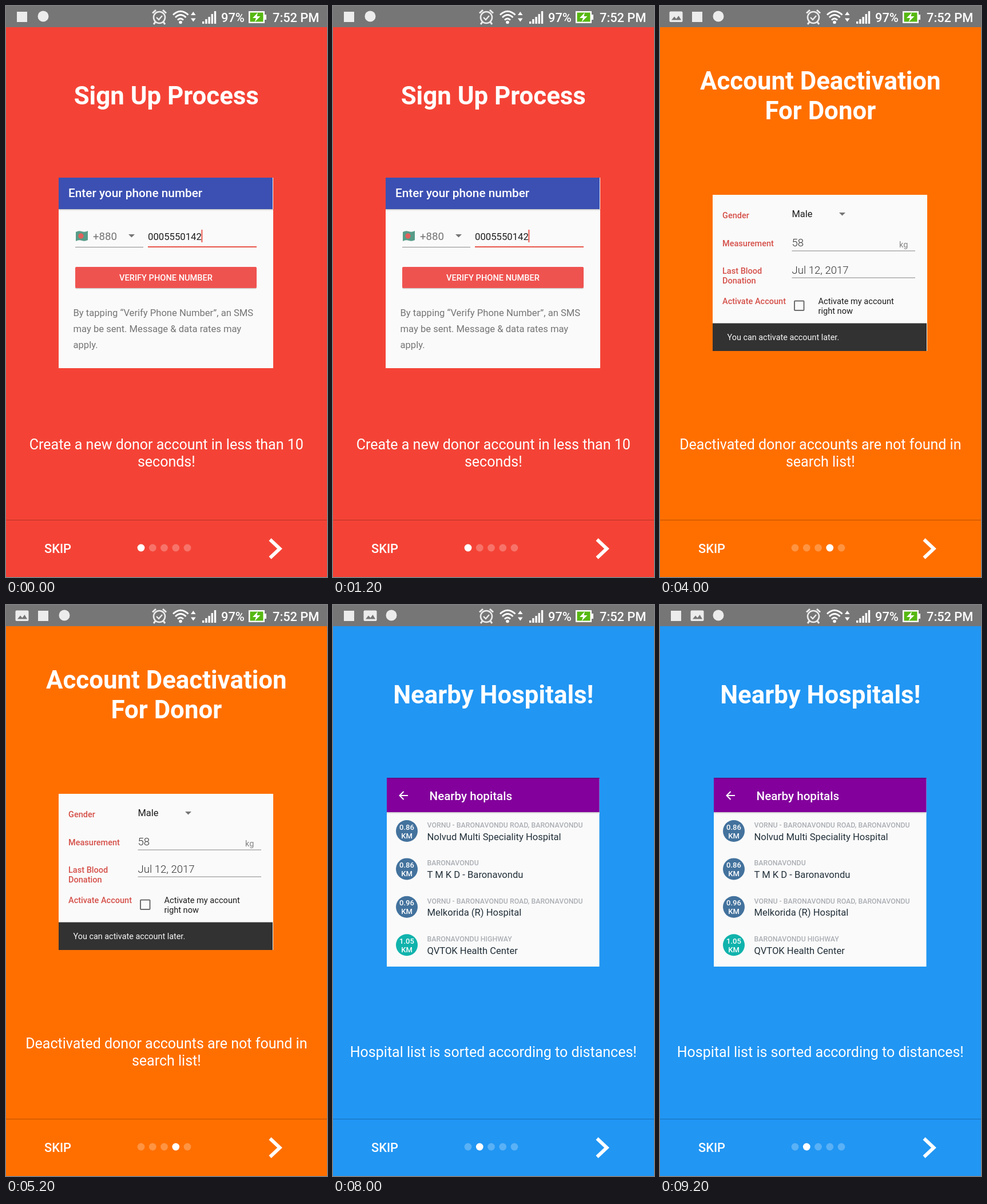
Recreate the animation shown at these times as an HTML page. Size 561 by 998 pixels, loop 10000 ms.

```html
<!DOCTYPE html>
<html lang="en">
<head>
<meta charset="utf-8">
<title>Donor app intro</title>
<style>
  html, body { margin: 0; width: 100%; height: 100%; overflow: hidden; }
  svg { display: block; width: 100vw; height: 100vh; }
  text { font-family: Roboto, sans-serif; white-space: pre; }
</style>
</head>
<body>
<svg id="stage" viewBox="0 0 561 998" xmlns="http://www.w3.org/2000/svg"></svg>
<script>
const STEP = 2000;
const GREY = '#757575', INK = '#1c1c1c', PAPER = '#fafafa', ICON = '#ececec';
const CALLER = '0005550142', HELPER = '0005550173';

// Drawing helpers
const text = (x, y, size, fill, str, weight = 400, anchor = 'start') =>
  `<text x="${x}" y="${y}" font-size="${size}" fill="${fill}" font-weight="${weight}" text-anchor="${anchor}">${str}</text>`;
const mid = (x, y, size, fill, str, weight) => text(x, y, size, fill, str, weight, 'middle');
const rect = (x, y, w, h, fill, r = 0) =>
  `<rect x="${x}" y="${y}" width="${w}" height="${h}" rx="${r}" fill="${fill}"/>`;
const disc = (x, y, r, fill, alpha = 1) =>
  `<circle cx="${x}" cy="${y}" r="${r}" fill="${fill}" fill-opacity="${alpha}"/>`;
const shape = (d, fill) => `<path d="${d}" fill="${fill}"/>`;
const stroke = (d, color, width) =>
  `<path d="${d}" fill="none" stroke="${color}" stroke-width="${width}"/>`;
const caret = (x, y) => shape(`M${x} ${y}h11l-5.5 5.5z`, GREY);
const shadow = (x, y, w) => rect(x, y, w, 1, '#c4c4c4') + rect(x, y + 1, w, 2, '#ebebeb');

// Status bar
const notices = {
  video: x => rect(x - 9, 10, 18, 18, ICON),
  robot: x => disc(x, 18, 9.5, ICON),
  picture: x => rect(x - 11.5, 9.5, 23, 18.5, ICON, 2) +
    shape(`M${x - 8} 24.5l5-6 3.5 4 4-5.5 4.500 7.500z`, GREY)
};

function statusBar(icons) {
  const bars = [4, 8, 12, 17, 22].map((h, i) => rect(343 + i * 5.2, 31 - h, 3.4, h, '#fff')).join('');
  return rect(0, 0, 561, 37, '#767676') +
    icons.map((name, i) => notices[name]([28, 65, 102][i])).join('') +
    `<circle cx="268" cy="20" r="10" fill="none" stroke="${ICON}" stroke-width="2.6"/>` +
    stroke('M256 12.500l6-5.500M280 12.500l-6-5.500M261 28l-3 4M275 28l3 4', ICON, 3) +
    stroke('M263 20l4 4 6-7', ICON, 2.4) +
    stroke('M292 15.500Q305 3 318.500 15.500M296 20Q305 11 314.500 20M300 24.500Q305 19.500 310 24.500', '#fff', 2.8) +
    disc(305, 28.5, 2.8, '#fff') +
    shape('M323 16l4.300-6 4.300 6zM323 21.500h8.600l-4.300 6z', '#fff') +
    bars +
    text(376, 27.5, 21.8, '#fff', '97%', 500) +
    rect(424, 9, 28, 21, '#fff') + rect(452, 15, 3, 9, '#fff') + rect(426.5, 11.5, 23, 16, '#57b812') +
    shape('M440 11.500l-9 9.500h6l-2.500 7 10-10h-6z', '#fff') +
    text(466, 27.5, 21.8, '#fff', '7:52 PM', 500);
}

// Bottom navigation
function footer(page) {
  const dots = [0, 1, 2, 3, 4].map(i =>
    disc(236 + i * 20.25, 947, 6.4, '#fff', i === page ? 1 : 0.26)).join('');
  const ends = page === 4
    ? mid(470.5, 956, 21.8, '#fff', 'DONE', 500)
    : mid(90.5, 956, 21.8, '#fff', 'SKIP', 500) + stroke('M461.500 932.500L478.500 948.500 461.500 964.500', '#fff', 6);
  return rect(0, 898, 561, 1, 'rgba(0,0,0,.26)') + dots + ends;
}

function signUp() {
  return rect(92, 300, 375, 333, PAPER) + rect(92, 300, 374, 55, '#3c50b3') + shadow(92, 355, 375) +
    text(109, 334, 20.8, '#fff', 'Enter your phone number', 500) +
    shape('M122 395q5-3 10.500-1t10.500-1v16q-5 3-10.500 1t-10.500 1z', '#579c88') + disc(131, 402, 4.7, '#e2605c') +
    text(152, 408.5, 18.7, GREY, '+880') + caret(214, 399) +
    rect(121, 421, 119, 1, '#8b8b8b') +
    text(248, 408.5, 16.7, INK, CALLER) +
    rect(341.5, 391, 1.8, 22, '#ea4e40') + rect(248, 420, 190, 2, '#e8564b') +
    rect(121, 457, 317, 37.5, '#cfcfcf', 2) + rect(121, 456, 317, 37, '#ef5350', 2) +
    mid(279.5, 480, 14.6, '#fff', 'VERIFY PHONE NUMBER', 500) +
    ['By tapping “Verify Phone Number”, an SMS', 'may be sent. Message &amp; data rates may', 'apply.']
      .map((line, i) => text(117.5, 542 + i * 28, 16.6, GREY, line)).join('');
}

function gear(x, y) {
  const teeth = [0, 45, 90, 135].map(a =>
    `<rect x="${x - 2.2}" y="${y - 10}" width="4.4" height="20" fill="#fff" transform="rotate(${a} ${x} ${y})"/>`).join('');
  return disc(x, y, 20, '#0bbbdc') + teeth + disc(x, y, 7.5, '#fff') + disc(x, y, 4.8, '#0bbbdc') + disc(x, y, 2.2, '#fff');
}

function notified() {
  const cyan = '#0bbbdc';
  return `<defs><linearGradient id="glow" x1="0" y1="0" x2="1" y2=".5">
      <stop offset=".55" stop-color="#000"/><stop offset=".8" stop-color="#381009"/><stop offset="1" stop-color="#080302"/>
    </linearGradient></defs>` +
    rect(101, 335, 358.5, 263.5, '#050505') + rect(330, 552, 129, 46, 'url(#glow)') +
    rect(102, 335, 357, 142, '#fdfdfd', 3) + rect(102, 486, 357, 66, '#f8f8f8', 3) +
    text(112, 404, 66, '#5c5c5c', '8:35', 100) + text(235.5, 404, 14, '#666', 'AM') +
    text(113, 428.5, 16.55, '#666', 'Wednesday, November 22, 2017') +
    gear(377, 370.5) +
    disc(428, 370.5, 20, cyan) +
    shape('M428 356c6.500 0 8.500 4.500 8 10.500-.5 5-2 7-4 9v4c3 2.500 7 2 8.500 5a19 19 0 0 1-25 0c1.500-3 5.500-2.500 8.500-5v-4c-2-2-3.500-4-4-9-.5-6 1.500-10.500 8-10.500z', '#a0e2ef') +
    rect(356, 404.5, 92, 31.5, cyan, 15.75) + mid(402, 428, 20, '#fff', 'Clear') +
    rect(119, 446.5, 322, 1, '#a9a9a9') +
    text(118.5, 466, 15.2, '#666', 'Navu/Colvimar 3G') +
    disc(134.5, 519, 21, '#9c9c9c') +
    shape('M127 524v-1.500l2-2v-4c0-3 1.500-5 4-5.500v-2h3v2c2.500.5 4 2.500 4 5.500v4l2 2v1.500zM132.500 525.500h4a2 2 0 0 1-4 0z', '#fff') +
    stroke('M134.500 514v6.500M131.300 517.200h6.500', '#9c9c9c', 1.4) +
    text(168, 514, 16.7, '#202020', 'New request for AB - blood!') +
    text(450.5, 514, 12.2, GREY, '8:35 AM', 400, 'end') +
    text(168, 534, 14.6, GREY, 'Request from 0' + HELPER) +
    `<circle cx="175" cy="577" r="11.5" fill="none" stroke="#fff" stroke-width="2"/>` +
    stroke('M168 580a7.500 7.500 0 0 1 14-4M182.500 580v-1M174 581l5.500-7.500', '#fff', 2) + disc(174.5, 581, 2.6, '#fff') +
    text(194.5, 584, 16.5, '#f4f4f4', 'Tap to manage notifications');
}

function deactivation() {
  const labels = [['Gender', 370.5], ['Measurement', 420], ['Last Blood', 468], ['Donation', 485], ['Activate Account', 521]];
  return rect(92, 330, 375, 273, PAPER) + rect(92, 554.5, 374, 48.5, '#323232') +
    labels.map(([name, y]) => text(109, y, 14.5, '#d54f49', name, 500)).join('') +
    text(230.5, 369, 16.4, INK, 'Male') + caret(313, 361) +
    text(230.5, 420, 18.6, '#333', '58', 300) + text(418, 421.5, 14.5, '#848484', 'kg') +
    text(230.5, 468, 18.6, '#333', 'Jul 12, 2017', 300) +
    rect(230.5, 427.5, 215.5, 1, '#858585') + rect(230.5, 474.5, 215.5, 1, '#858585') +
    `<rect x="235" y="515.5" width="16.5" height="16.5" rx="1" fill="none" stroke="#6c6c6c" stroke-width="2"/>` +
    text(276.5, 521, 14.6, INK, 'Activate my account') + text(276.5, 538, 14.6, INK, 'right now') +
    text(117.5, 584, 14.4, '#f6f6f6', 'You can activate account later.');
}

function chat() {
  const talk = [['Is anybody online?', 392.5], ['yes, I am there. are u searching', 443], ['for blood?', 469.5], ['I am seaeching for O -.', 519.5]];
  const senders = [[CALLER, 414], [HELPER, 491], [CALLER, 541]];
  return rect(92, 321, 375, 291.5, PAPER) +
    talk.map(([line, y]) => text(109.5, y, 22.9, INK, line)).join('') +
    senders.map(([number, y]) => text(109.5, y, 14.7, '#7d7d7d', '+880' + number)).join('') +
    `<g fill="none" stroke="#858585"><rect x="114.500" y="550.500" width="27" height="27" stroke-width="1.3"/>
      <rect x="117.500" y="553.500" width="21" height="21" stroke-width="1.3"/>
      <path d="M118 571q4-8 8-4t6-3 6 7" stroke-width="1.4"/></g>` +
    rect(151, 584, 204, 2, '#1a968b') +
    rect(363, 552, 83.5, 37, '#d5d6d6', 2) + mid(405, 576, 14.5, '#a1a1a1', 'SEND', 500);
}

function hospitals() {
  const road = 'VORNU - BARONAVONDU ROAD, BARONAVONDU';
  const rows = [
    ['0.86', road, 'Nolvud Multi Speciality Hospital'],
    ['0.86', 'BARONAVONDU', 'T M K D - Baronavondu'],
    ['0.96', road, 'Melkorida (R) Hospital'],
    ['1.05', 'BARONAVONDU HIGHWAY', 'QVTOK Health Center']
  ];
  const list = rows.map(([km, place, name], i) => `<g transform="translate(0 ${i * 66.4})">` +
    disc(129, 395, 19, i === 3 ? '#10b3ac' : '#43729d') +
    mid(129, 392.5, 13, '#fff', km, 500) + mid(129, 407.5, 13, '#fff', 'KM', 500) +
    text(164.5, 389, 12.35, '#abafb4', place, 500) + text(164.5, 410.5, 16.6, '#22303a', name) + '</g>').join('');
  return rect(94, 302, 371.5, 330, PAPER) + rect(94, 302, 371.5, 60, '#83009c') +
    rect(94, 302, 371.5, 1.5, '#62007c') + shadow(94, 362, 371.5) +
    stroke('M131 333h-14M123.500 326l-7 7 7 7', '#fff', 2) +
    text(168.5, 341, 20.6, '#fff', 'Nearby hopitals', 500) + list;
}

const scenes = [
  { bg: '#f44336', page: 0, icons: ['video', 'robot'], title: ['Sign Up Process'], art: signUp,
    note: ['Create a new donor account in less than 10', 'seconds!'] },
  { bg: '#4caf50', page: 2, icons: ['picture', 'video', 'robot'], title: ['Get Notified!'], art: notified,
    note: ['Get notification for blood request if you are a', 'donor!'] },
  { bg: '#ff6f00', page: 3, icons: ['picture', 'video', 'robot'], title: ['Account Deactivation', 'For Donor'], art: deactivation,
    note: ['Deactivated donor accounts are not found in', 'search list!'] },
  { bg: '#9b27ad', page: 4, icons: ['picture', 'video', 'robot'], title: ['Chat with other people!'], art: chat,
    note: ['Get help as a requester and give help as a', 'donor easily!'] },
  { bg: '#2196f3', page: 1, icons: ['video', 'picture', 'robot'], title: ['Nearby Hospitals!'], art: hospitals,
    note: ['Hospital list is sorted according to distances!'] }
];

// Lines are centred around a common middle
const block = (lines, y, gap, size, weight) => lines.map((line, i) =>
  mid(280.3, y + (i - (lines.length - 1) / 2) * gap, size, '#fff', line, weight)).join('');

const stage = document.getElementById('stage');
stage.innerHTML = scenes.map(s => '<g>' + rect(0, 0, 561, 998, s.bg) + statusBar(s.icons) +
  block(s.title, 172, 51.5, 43.8, 700) + s.art() + block(s.note, 790, 30, 25, 400) +
  footer(s.page) + '</g>').join('');
const layers = [...stage.children];

function draw() {
  const now = Math.floor(performance.now() / STEP) % scenes.length;
  layers.forEach((layer, i) => layer.style.display = i === now ? '' : 'none');
  requestAnimationFrame(draw);
}
draw();
</script>
</body>
</html>
```
